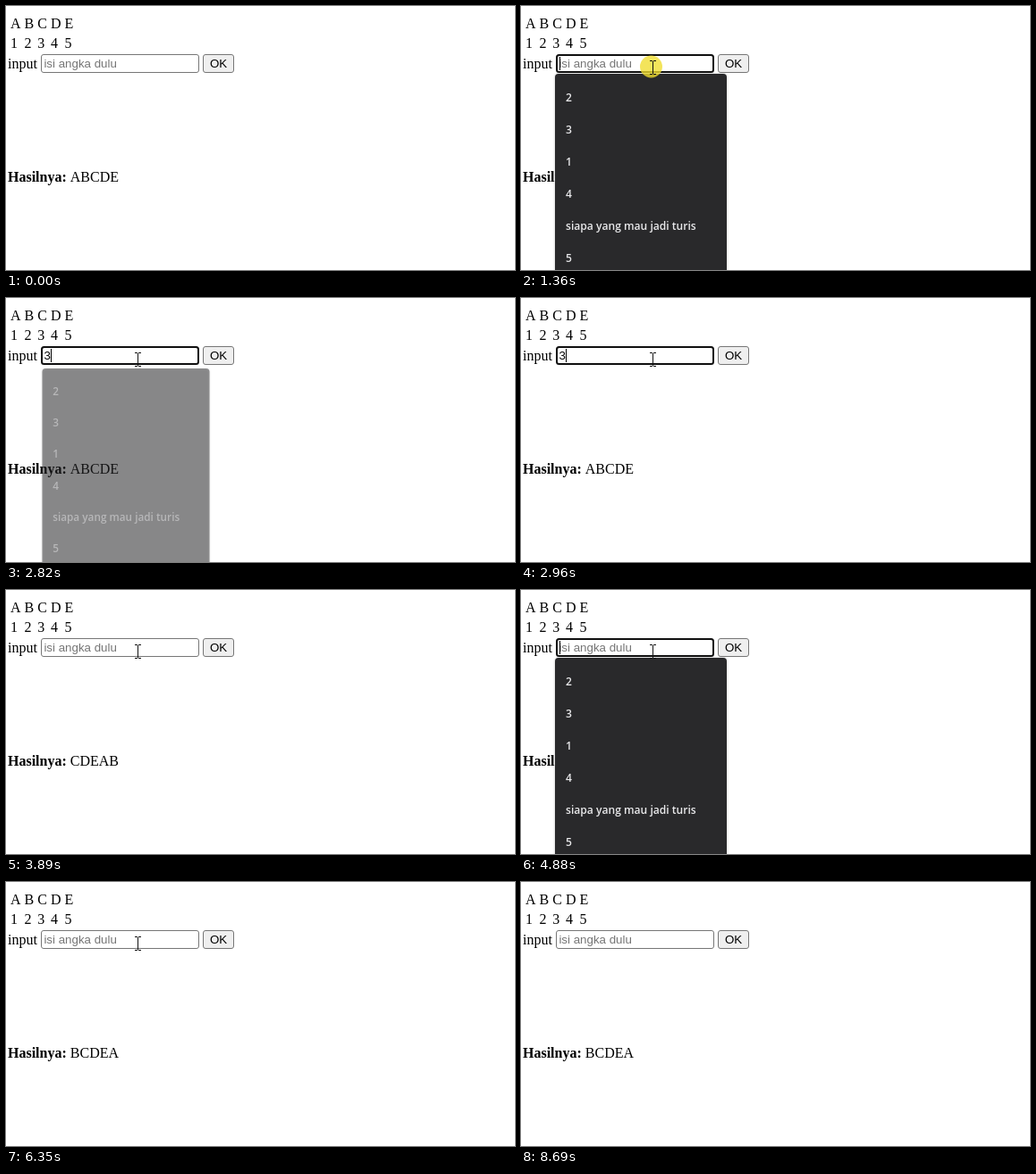
These frames come from a looping animation (569x296 px, 9.16 s). An HTML page with a canvas:

```html
<!DOCTYPE html>
<html lang="id">
<head>
<meta charset="utf-8">
<title>Input</title>
<style>
html, body { margin: 0; width: 100%; height: 100%; overflow: hidden; background: #fff; }
canvas { display: block; }
</style>
</head>
<body>
<canvas id="stage" width="569" height="296"></canvas>
<script>
const ctx = document.getElementById('stage').getContext('2d');
const LOOP = 9160;
const SERIF = '"Liberation Serif", "Times New Roman", serif';
const SANS = '"Liberation Sans", Arial, sans-serif';
const BODY = '16px ' + SERIF;
const FIELD = '13.333px ' + SANS;
const ITEM = '600 12.1px "Open Sans", "Noto Sans", sans-serif';
const ITEMS = ['2', '3', '1', '4', 'siapa yang mau jadi turis', '5'];
const REST = { x: 147, y: 69 };

// One visit to the field: focus, typing, caret blinks, submit.
const ROUNDS = [
  { click: 1270, focus: 1360, release: 1430, blinks: [1890, 2420], type: 2750,
    key: '3', fade: [0.83, 0.49, 0.17], caretOff: 3290, submit: 3820 },
  { click: 4810, focus: 4810, release: 4880, blinks: [], type: 5340,
    key: '2', fade: [1, 0.67, 0.33], caretOff: 5880, submit: 6280 }
];

const within = (t, a, b) => t >= a && t < b;

function text(str, x, y, font, color = '#000') {
  ctx.font = font;
  ctx.fillStyle = color;
  ctx.fillText(str, x, y);
}

function box(x, y, w, h, r, fill, stroke, line = 1) {
  const d = line / 2;
  ctx.beginPath();
  ctx.roundRect(x + d, y + d, w - line, h - line, r);
  ctx.fillStyle = fill;
  ctx.fill();
  ctx.lineWidth = line;
  ctx.strokeStyle = stroke;
  ctx.stroke();
}

function drawPage(result) {
  const xs = [5, 20.5, 35.2, 49.9, 65.4];
  xs.forEach((x, i) => {
    text('ABCDE'[i], x, 25, BODY);
    text(String(i + 1), x, 47, BODY);
  });
  text('input', 2, 70, BODY);
  box(220, 54, 35, 21, 2.5, '#efefef', '#767676');
  text('OK', 228, 69, FIELD);
  text('Hasilnya:', 2, 197, 'bold ' + BODY);
  text(result, 71.8, 197, BODY);
}

function drawField(t, round, hover) {
  if (!round) {
    box(39, 54, 177, 21, 2.5, '#fff', hover ? '#4f4f4f' : '#767676');
    text('isi angka dulu', 42.4, 69, FIELD, '#757575');
    return;
  }
  box(39, 54, 177, 21, 2.5, '#fff', '#101010', 2);
  const typed = t >= round.type;
  if (typed) text(round.key, 42.4, 69, FIELD);
  else text('isi angka dulu', 42.4, 69, FIELD, '#757575');
  const off = typed ? t >= round.caretOff : within(t, ...round.blinks);
  if (!off) {
    ctx.fillStyle = '#000';
    ctx.fillRect(typed ? 50 : 43, 57, 1, 15);
  }
}

function drawPopup(alpha) {
  if (!alpha) return;
  const s = 0.95 + 0.05 * alpha;
  ctx.save();
  ctx.globalAlpha = alpha;
  ctx.translate(134, 196);
  ctx.scale(s, s);
  ctx.translate(-134, -196);
  ctx.shadowColor = 'rgba(0,0,0,0.25)';
  ctx.shadowBlur = 3;
  ctx.fillStyle = '#29292b';
  ctx.beginPath();
  ctx.roundRect(38, 76, 192, 240, 4);
  ctx.fill();
  ctx.shadowColor = 'transparent';
  ITEMS.forEach((item, i) => text(item, 50, 107 + 36 * i, ITEM, '#e9e9eb'));
  ctx.restore();
}

function popupAlpha(t, round) {
  if (!round) return 0;
  if (t < round.type) return 1;
  return round.fade[Math.floor((t - round.type) / 70)] || 0;
}

function cursorAt(t) {
  const mix = (a, b, u) => ({ x: Math.round(a.x + (b.x - a.x) * u), y: Math.round(a.y + (b.y - a.y) * u) });
  if (t < 260 || t >= 8690) return null;
  if (t < 1010) {
    const u = Math.floor((t - 260) / 68.2) / 11;
    return mix({ x: 320, y: 228 }, REST, 1 - (1 - u) ** 2);
  }
  if (t < 8020) return REST;
  const u = (Math.floor((t - 8020) / 67) + 1) / 10;
  return mix(REST, { x: 535, y: 288 }, u ** 1.6);
}

const overField = p => !!p && p.x >= 39 && p.x < 216 && p.y >= 54 && p.y < 75;

function drawBeam({ x, y }) {
  ctx.fillStyle = '#111';
  ctx.fillRect(x, y - 7, 1, 14);
  for (const dy of [-8, 7]) {
    ctx.fillRect(x - 3, y + dy, 3, 1);
    ctx.fillRect(x + 1, y + dy, 3, 1);
  }
}

function drawArrow({ x, y }) {
  ctx.save();
  ctx.translate(x + 0.5, y + 0.5);
  ctx.beginPath();
  ctx.moveTo(0, 0);
  for (const [px, py] of [[0, 16], [3.7, 12.6], [6.2, 18.3], [8.6, 17.2], [6.2, 11.6], [11.3, 11.3]])
    ctx.lineTo(px, py);
  ctx.closePath();
  ctx.fillStyle = '#fff';
  ctx.fill();
  ctx.lineWidth = 1;
  ctx.strokeStyle = '#000';
  ctx.stroke();
  ctx.restore();
}

function drawClick() {
  ctx.fillStyle = 'rgba(240,221,45,0.78)';
  ctx.beginPath();
  ctx.arc(145.5, 68, 12.5, 0, Math.PI * 2);
  ctx.fill();
}

function draw(t) {
  const round = ROUNDS.find(r => within(t, r.focus, r.submit));
  const cursor = cursorAt(t);
  const onField = overField(cursor);
  const result = t >= ROUNDS[1].submit ? 'BCDEA' : t >= ROUNDS[0].submit ? 'CDEAB' : 'ABCDE';

  ctx.fillStyle = '#fff';
  ctx.fillRect(0, 0, 569, 296);
  drawPage(result);
  drawField(t, round, onField && t < ROUNDS[0].focus);
  drawPopup(popupAlpha(t, round));
  if (ROUNDS.some(r => within(t, r.click, r.release))) drawClick();
  if (cursor) (onField ? drawBeam : drawArrow)(cursor);
}

const start = performance.now();
function tick() {
  draw((performance.now() - start) % LOOP);
  requestAnimationFrame(tick);
}
tick();
</script>
</body>
</html>
```
